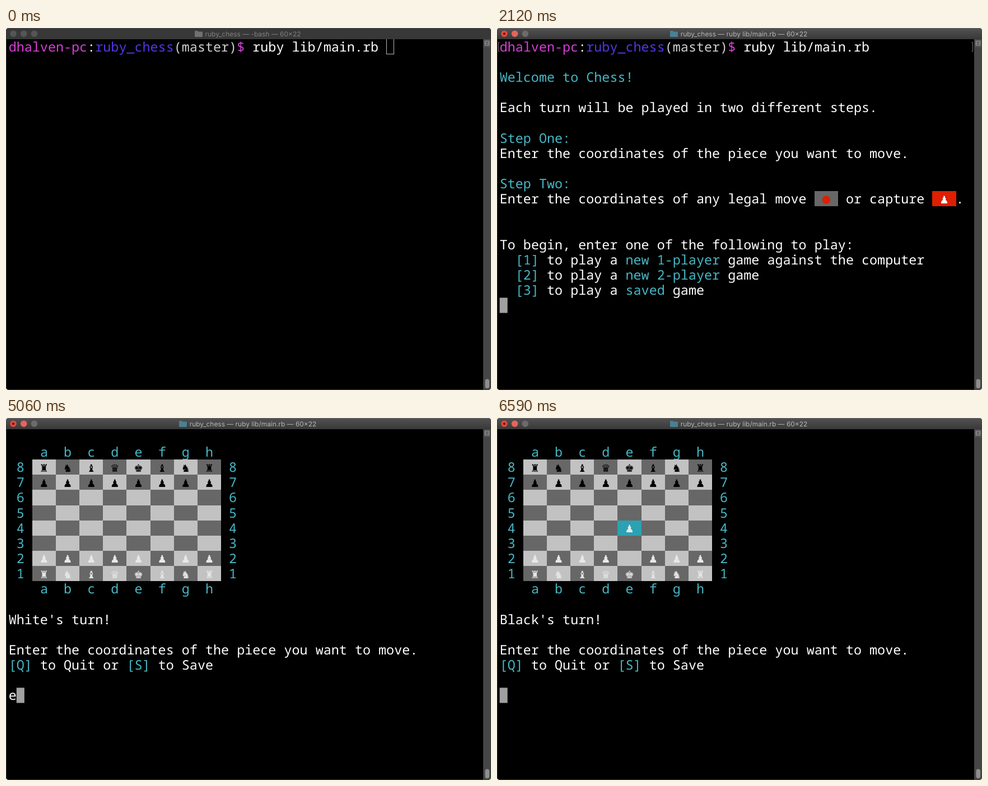
These frames come from a looping animation (866 by 646 pixels, 8 s). An HTML page:

```html
<!DOCTYPE html>
<html lang="en">
<head>
<meta charset="utf-8">
<title>Terminal chess</title>
<style>
  html, body { margin: 0; width: 100%; height: 100%; overflow: hidden; background: #fff; }
  svg { display: block; width: 866px; height: 646px; }
  text { white-space: pre; text-rendering: geometricPrecision; }
  .term text { font: 500 23.42px "Noto Sans Mono", "DejaVu Sans Mono", monospace; }
  .term .piece { font: 18.5px "DejaVu Sans", sans-serif; text-anchor: middle; }
  .title { font: 11.95px Inter, "Liberation Sans", sans-serif; text-anchor: middle; }
</style>
</head>
<body>
<svg viewBox="0 0 866 646">
  <defs>
    <linearGradient id="bar" x2="0" y2="1">
      <stop stop-color="#525252"/><stop offset="1" stop-color="#393939"/>
    </linearGradient>
    <clipPath id="window"><rect width="866" height="646" rx="5"/></clipPath>
  </defs>
  <g clip-path="url(#window)">
    <rect width="866" height="646"/>
    <g id="screen" class="term"></g>
    <g id="titlebar"></g>
    <rect x="852" y="20" width="14" height="626" fill="#464646"/>
    <rect x="853" y="21" width="12" height="13" fill="#565656"/>
    <path d="M855.5 23.5h7v7h-7zM855.5 27h7" fill="none" stroke="#a0a0a0"/>
    <rect x="855.5" y="626.5" width="7.5" height="16.5" rx="3.75" fill="#8e8e8e"/>
    <path d="M.5 20V645.5H852" fill="none" stroke="#363636"/>
  </g>
</svg>
<script>
const CELL = 14.05, LINE = 27.15, LEFT = 4.7, TOP = 19.8;
const LOOP = 8000;
const WHITE = '#fff', CYAN = '#47b8c6', MAGENTA = '#d540d5', BLUE = '#5138e6';
const GREY = '#676767', LIGHT = '#c2c2c2', RED = '#de1f00';

const x = col => +(LEFT + col * CELL).toFixed(2);
const y = row => +(TOP + row * LINE).toFixed(2);
const rect = (x, y, w, h, fill) => `<rect x="${x}" y="${y}" width="${w}" height="${h}" fill="${fill}"/>`;
const circle = (cx, cy, r, fill) => `<circle cx="${cx}" cy="${cy}" r="${r}" fill="${fill}"/>`;

// Every word sits on its own terminal column.
const print = (row, col, string, fill = WHITE) =>
  [...string.matchAll(/\S+/g)].map(word =>
    `<text x="${x(col + word.index)}" y="${y(row) + 22}" fill="${fill}">${word[0]}</text>`).join('');

// Consecutive runs of [text, colour] on one line.
function line(row, ...runs) {
  let col = 0;
  return runs.map(([string, fill]) => {
    const out = print(row, col, string, fill);
    col += string.length;
    return out;
  }).join('');
}

const cursor = (row, col = 0) => rect(x(col), y(row), CELL, LINE, '#a0a0a0');
const typed = (row, string) => print(row, 0, string) + cursor(row, string.length);
const entered = (row, string) => print(row, 0, string) + cursor(row + 1);

const square = (row, col, fill) =>
  `<g shape-rendering="crispEdges">${rect(x(col), y(row), 3 * CELL, LINE, fill)}</g>`;
const piece = (row, col, glyph, fill) =>
  `<text class="piece" x="${x(col + 1.5)}" y="${y(row) + 21.4}" fill="${fill}">${glyph}</text>`;
const dot = (row, col) => circle(x(col + 1.5), y(row) + 15.4, 7.2, RED);

const legend = (row, col) =>
  square(row, col, GREY) + dot(row, col) + print(row, col + 4, 'or capture') +
  square(row, col + 15, RED) + piece(row, col + 15, '♟', WHITE) + print(row, col + 18, '.');

function board({ pawn, marked, color, moves = [] }) {
  const back = '♜♞♝♛♚♝♞♜';
  let out = '';
  for (let file = 0; file < 8; file++) {
    const col = 3 + file * 3, letter = 'abcdefgh'[file];
    out += print(1, col + 1, letter, CYAN) + print(10, col + 1, letter, CYAN);
    for (let rank = 8; rank > 0; rank--) {
      const row = 10 - rank, name = letter + rank;
      const shade = (rank + file) % 2 ? GREY : LIGHT;
      out += square(row, col, name === marked ? color : shade);
      const isPawn = letter === 'e' ? name === pawn : rank === 2;
      if (rank > 6) out += piece(row, col, rank === 8 ? back[file] : '♟', '#000');
      else if (rank === 1) out += piece(row, col, back[file], '#e4e4e4');
      else if (isPawn) out += piece(row, col, '♟', '#e8e8e8');
      if (moves.includes(name)) out += dot(row, col);
    }
  }
  for (let rank = 1; rank <= 8; rank++)
    out += print(10 - rank, 1, `${rank}`, CYAN) + print(10 - rank, 28, `${rank}`, CYAN);
  return out;
}

const prompt = line(0, ['dhalven-pc', MAGENTA], [':', WHITE], ['ruby_chess', BLUE],
  ['(master)', '#d0d0d0'], ['$', MAGENTA], [' ruby lib/main.rb', WHITE]);
const hollow = '<rect x="679.5" y="19.5" width="13" height="27" fill="none" stroke="#b8b8b8"/>';
const started = prompt +
  '<path d="M4.5 25.5h-2v16h2M847.5 25.5h2v16h-2" fill="none" stroke="#777"/>';

const option = (row, key, name, rest) =>
  line(row, ['  '], [`[${key}]`, CYAN], [' to play a '], [name, CYAN], [rest]);
const welcome = started +
  print(2, 0, 'Welcome to Chess!', CYAN) +
  print(4, 0, 'Each turn will be played in two different steps.') +
  print(6, 0, 'Step One:', CYAN) +
  print(7, 0, 'Enter the coordinates of the piece you want to move.') +
  print(9, 0, 'Step Two:', CYAN) +
  print(10, 0, 'Enter the coordinates of any legal move') + legend(10, 40) +
  print(13, 0, 'To begin, enter one of the following to play:') +
  option(14, 1, 'new 1-player', ' game against the computer') +
  option(15, 2, 'new 2-player', ' game') +
  option(16, 3, 'saved', ' game');

const turn = player =>
  print(12, 0, `${player}'s turn!`) +
  print(14, 0, 'Enter the coordinates of the piece you want to move.') +
  line(15, ['[Q]', CYAN], [' to Quit or '], ['[S]', CYAN], [' to Save']);

const whiteTurn = board({ pawn: 'e2' }) + turn('White');
const choosing = board({ pawn: 'e2', marked: 'e2', color: '#36e1e4', moves: ['e3', 'e4'] }) +
  print(13, 0, 'Enter the coordinates of a legal move') + legend(13, 38);
const blackTurn = board({ pawn: 'e4', marked: 'e4', color: '#2aa2b3' }) + turn('Black');

function titlebar(process, iconX, active = true, busy = false) {
  const buttons = active ? ['#e2483c', '#e6645b', '#6b6b6b'] : Array(3).fill('#555');
  return rect(0, 0, 866, 20, active ? 'url(#bar)' : '#383838') +
    rect(0, 0, 866, 1, active ? '#666' : '#484848') +
    buttons.map((fill, i) => circle(13 + i * 18.7, 10.2, 5.8, fill)).join('') +
    (busy ? circle(13, 10.2, 2, '#6a0c06') : '') +
    `<path transform="translate(${iconX} 5)" d="M0 1q0-1 1-1h4l1.5 1.5H13q1 0 1 1V10q0 1-1 1H1q-1 0-1-1z"
      fill="${active ? '#4b7f95' : '#707070'}"/>` +
    `<text class="title" x="441" y="15" fill="${active ? '#b8b8b8' : '#808080'}">ruby_chess — ${process} — 60×22</text>`;
}
const idle = titlebar('-bash', 337, false);
const focused = titlebar('-bash', 337);
const launching = titlebar('bash /usr/local/bin/ruby lib/main.rb', 256, true, true);
const running = titlebar('ruby lib/main.rb', 309, true, true);

// [start in ms, title bar, terminal contents]
const timeline = [
  [0, idle, prompt + hollow],
  [820, focused, prompt + cursor(0, 48)],
  [1710, focused, started + cursor(1)],
  [1770, launching, started + cursor(1)],
  [1940, running, started + cursor(1)],
  [2120, running, welcome + cursor(17)],
  [2940, running, welcome + typed(17, '2')],
  [3120, running, welcome + entered(17, '2')],
  [3180, running, whiteTurn + cursor(17)],
  [5060, running, whiteTurn + typed(17, 'e')],
  [5290, running, whiteTurn + typed(17, 'e2')],
  [5590, running, whiteTurn + entered(17, 'e2')],
  [5650, running, choosing + cursor(15)],
  [6240, running, choosing + typed(15, 'e')],
  [6350, running, choosing + typed(15, 'e4')],
  [6530, running, choosing + entered(15, 'e4')],
  [6590, running, blackTurn + cursor(17)],
];

const screenGroup = document.getElementById('screen');
const titleGroup = document.getElementById('titlebar');
const origin = performance.now();
let shown;

function draw() {
  const time = Math.max(0, performance.now() - origin) % LOOP;
  const step = timeline.findLast(([start]) => start <= time);
  if (step !== shown) {
    shown = step;
    titleGroup.innerHTML = step[1];
    screenGroup.innerHTML = step[2];
  }
  requestAnimationFrame(draw);
}
draw();
</script>
</body>
</html>
```
